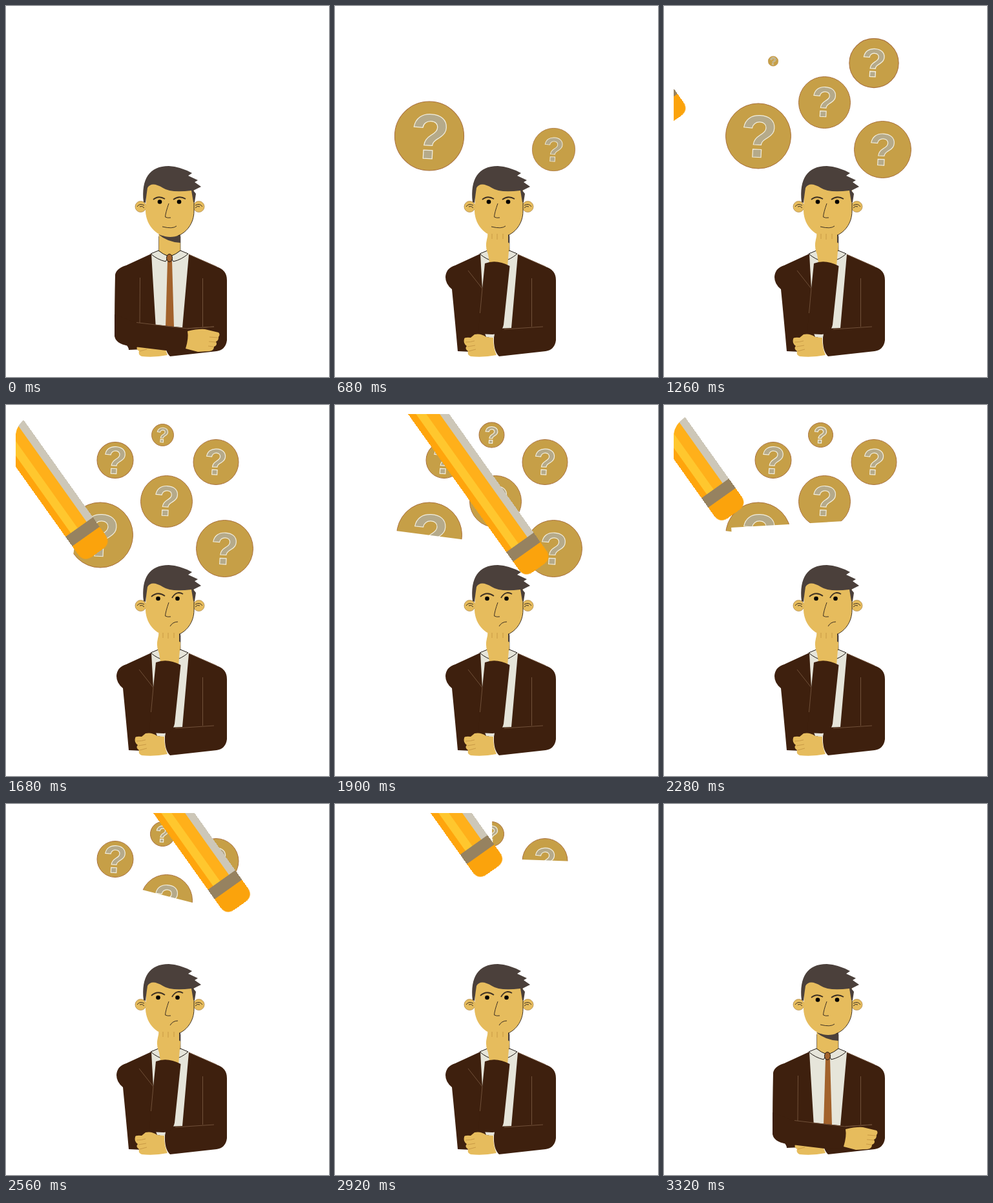
Recreate the animation shown at these times as an HTML page without scripts. Size 500x575 px, loop 4000 ms.

```html
<!DOCTYPE html>
<html lang="en">
<head>
<meta charset="utf-8">
<title>Questions erased</title>
<style>
html, body { margin: 0; width: 100%; height: 100%; overflow: hidden; background: #fff; }
svg { display: block; width: 100vw; height: 100vh; }

.skin { fill: #e6bc5d; }
.suit { fill: #3e200e; }
.shirt { fill: #e6e5da; }
.hair { fill: #4b403b; }
.seam { fill: none; stroke: #705039; stroke-width: 1; }
.line { fill: none; stroke: #3d3022; stroke-width: 1; }
.brow { fill: none; stroke: #3d3022; stroke-width: 1.8; }
.crease { fill: none; stroke: #c99a45; stroke-width: 1; }
.collar { stroke: #1c1611; stroke-width: 1; stroke-linejoin: round; }

.bubble circle { fill: #c69f47; stroke: #a9713f; stroke-width: 1; }
.bubble text {
  font-family: "Liberation Sans", Arial, sans-serif; font-weight: 700; text-anchor: middle;
  fill: #b5aa8a; stroke: #f3efdf; stroke-width: 1.2;
}

.bubble, .pencil, .wipe path, .calm, .think, .armA, .armB, .upper, .foldA, .foldB {
  animation: 4s linear infinite both;
}

/* bubbles spring out one after another */
.bubble { animation-name: pop; animation-delay: var(--t); }
@keyframes pop {
  0% { transform: scale(0); }
  1.2% { transform: scale(.27); }
  4.5% { transform: scale(.75); }
  6.5% { transform: scale(1.03); }
  7.7% { transform: scale(1.1); }
  9.8% { transform: scale(1.06); }
  11.8%, 62% { transform: scale(1); }
  62.01%, 100% { transform: scale(0); }
}

/* eraser strokes */
.wipe path { fill: none; stroke: #000; stroke-width: 100; stroke-dasharray: 1 2; }
.wipe .w1 { animation-name: w1; }
.wipe .w2 { animation-name: w2; }
.wipe .w3 { animation-name: w3; }
.wipe .w4 { animation-name: w4; }
.wipe .w5 { animation-name: w5; }
@keyframes w1 { 0%, 40% { stroke-dashoffset: 1; } 50.5%, 100% { stroke-dashoffset: 0; } }
@keyframes w2 { 0%, 50.5% { stroke-dashoffset: 1; } 56%, 100% { stroke-dashoffset: 0; } }
@keyframes w3 { 0%, 58% { stroke-dashoffset: 1; } 65%, 100% { stroke-dashoffset: 0; } }
@keyframes w4 { 0%, 65% { stroke-dashoffset: 1; } 70.5%, 100% { stroke-dashoffset: 0; } }
@keyframes w5 { 0%, 70.5% { stroke-dashoffset: 1; } 76%, 100% { stroke-dashoffset: 0; } }

.pencil { animation-name: scrub; }
@keyframes scrub {
  0%, 30% { transform: translate(-70px, 140px); }
  31.5% { transform: translate(-.5px, 151px); }
  40% { transform: translate(60px, 195px); }
  47.5% { transform: translate(296px, 227.5px); }
  50% { transform: translate(370px, 236px); }
  51% { transform: translate(362px, 202px); }
  56% { transform: translate(75px, 180px); }
  57% { transform: translate(89.5px, 144.5px); }
  58% { transform: translate(96px, 118px); }
  64% { transform: translate(344px, 132.5px); }
  65% { transform: translate(348px, 130px); }
  70.5% { transform: translate(128px, 100px); }
  76% { transform: translate(340px, 52px); }
  79%, 100% { transform: translate(265px, -60px); }
}

.calm { animation-name: calm; }
.think { animation-name: think; }
@keyframes calm { 0%, 41.5% { opacity: 1; } 41.51%, 76% { opacity: 0; } 76.01%, 100% { opacity: 1; } }
@keyframes think { 0%, 41.5% { opacity: 0; } 41.51%, 76% { opacity: 1; } 76.01%, 100% { opacity: 0; } }

/* the crossed forearm swings up to the chin and back */
.armA { animation-name: armA; transform-origin: 185px 512px; }
.armB { animation-name: armB; transform-origin: 245px 500px; }
@keyframes armA {
  0%, 6% { transform: none; opacity: 1; }
  11.5% { transform: translate(30px, -6px) rotate(-44deg); opacity: 1; }
  11.51%, 78% { transform: translate(30px, -6px) rotate(-44deg); opacity: 0; }
  78.01% { transform: translate(30px, -6px) rotate(-44deg); opacity: 1; }
  83%, 100% { transform: none; opacity: 1; }
}
@keyframes armB {
  0%, 11.5% { transform: translate(-30px, 6px) rotate(44deg); opacity: 0; }
  11.51% { transform: translate(-30px, 6px) rotate(44deg); opacity: 1; }
  17%, 73.5% { transform: none; opacity: 1; }
  78% { transform: translate(-30px, 6px) rotate(44deg); opacity: 1; }
  78.01%, 100% { transform: translate(-30px, 6px) rotate(44deg); opacity: 0; }
}
.upper { animation-name: upper; }
@keyframes upper {
  0%, 6%, 83%, 100% { d: path("M169 417Q170 407 186 402L225 384L232 500L212 532L190 533Q190 524 168 512Q168 460 169 417Z"); }
  17%, 73.5% { d: path("M171 420Q172 406 186 402L225 384L228 438L240 512L212 536L190 535Q186 490 181 439Q171 431 171 420Z"); }
}
.foldA { animation-name: foldA; }
.foldB { animation-name: foldB; }
@keyframes foldA { 0%, 7% { opacity: 1; } 7.01%, 82% { opacity: 0; } 82.01%, 100% { opacity: 1; } }
@keyframes foldB { 0%, 15% { opacity: 0; } 15.01%, 74% { opacity: 1; } 74.01%, 100% { opacity: 0; } }
</style>
</head>
<body>
<svg viewBox="0 0 500 575">
  <defs>
    <mask id="left" maskUnits="userSpaceOnUse" x="0" y="0" width="500" height="575">
      <rect width="500" height="575" fill="#fff"/>
      <g class="wipe">
        <path class="w1" pathLength="1" d="M30 237L405 286"/>
        <path class="w2" pathLength="1" d="M420 222L107 240"/>
        <path class="w3" pathLength="1" d="M80 151L400 233"/>
        <path class="w4" pathLength="1" d="M400 140L110 130"/>
        <path class="w5" pathLength="1" d="M110 50L400 50"/>
      </g>
    </mask>
    <clipPath id="frame"><path d="M38 14H485V560H15V45Q17 30 31 20Z"/></clipPath>
  </defs>

  <!-- bubbles -->
  <g mask="url(#left)">
    <g transform="translate(146 201.500)"><g class="bubble" style="--t:.29s"><circle r="50.500"/><text x="1" y="33" font-size="93" transform="rotate(3)">?</text></g></g>
    <g transform="translate(338.500 222.500)"><g class="bubble" style="--t:.5s"><circle r="44"/><text y="24.500" font-size="70" transform="rotate(3)">?</text></g></g>
    <g transform="translate(248.500 149.500)"><g class="bubble" style="--t:.71s"><circle r="40"/><text y="22" font-size="66" transform="rotate(3)">?</text></g></g>
    <g transform="translate(325 88.500)"><g class="bubble" style="--t:.96s"><circle r="35"/><text y="19.500" font-size="57" transform="rotate(3)">?</text></g></g>
    <g transform="translate(169 85.500)"><g class="bubble" style="--t:1.21s"><circle r="28"/><text y="21" font-size="60" transform="rotate(3)">?</text></g></g>
    <g transform="translate(242.500 46.500)"><g class="bubble" style="--t:1.46s"><circle r="19"/><text y="12.500" font-size="36" transform="rotate(3)">?</text></g></g>
  </g>

  <!-- neck, shirt, tie -->
  <path class="skin" d="M236.500 340H270V392H236.500Z"/>
  <path class="line" d="M236.500 357V380M270 357V380" opacity=".6"/>
  <path class="hair" d="M236 354Q253 360 270 351V367Q250 366 236 354Z"/>
  <path class="shirt" d="M224 384L252 388L283 384L274 502L231 502Z"/>
  <path fill="#a2622c" d="M250 395H257L260 498H247Z"/>
  <path class="shirt collar" d="M224 384L236 379Q243 385 252 388L247 396Q234 393 224 384Z"/>
  <path class="shirt collar" d="M254 388Q263 385 270 379L282 384Q272 393 259 396Z"/>
  <ellipse class="collar" cx="253" cy="390.500" rx="4.500" ry="6" fill="#a2622c"/>

  <!-- head -->
  <g stroke="#b08a4a" stroke-width=".8">
    <circle class="skin" cx="208.500" cy="311" r="8.500"/>
    <circle class="skin" cx="298.500" cy="311" r="8.500"/>
  </g>
  <path class="line" d="M203 311Q207 305 214 309M207 311Q211 309 214 313M304 311Q300 305 293 309M300 311Q296 309 293 313"/>
  <path class="skin" d="M218 268L216 318C217 342 235 358 254 358C275 358 291 340 291 318V268Z"/>
  <path class="line" d="M291 300V318C291 338 278 352 266 356"/>
  <path class="hair" d="M213 304C209 268 222 248 252 248Q270 249 288 259L282 263L297 270L292 273L302 280L290 286L294 291L292 304H290L287 286Q255 290 243 282Q225 271 219 282Q217 296 216 305Z"/>
  <path class="line" d="M252 306Q247 320 246.500 327Q250 329 255 328"/>
  <g class="calm">
    <circle cx="238" cy="303.500" r="3.300"/><circle cx="268" cy="303.500" r="3.300"/>
    <path class="brow" d="M228 300Q236 293 246 299M259 300Q268 293 278 299"/>
    <path class="line" d="M242 342Q258 346 264 341"/>
  </g>
  <g class="think">
    <circle cx="235.500" cy="300" r="3.300"/><circle cx="265.500" cy="300" r="3.300"/>
    <path class="brow" d="M225 297Q235 288 246 296M257 299Q264 287 274 293"/>
    <path class="line" d="M254 343Q258 336 266 336"/>
  </g>

  <!-- jacket -->
  <path class="upper suit" d="M169 417Q170 407 186 402L225 384L232 500L212 532L190 533Q190 524 168 512Q168 460 169 417Z"/>
  <path class="suit" d="M283 385L326 404Q342 409 342 425V518Q340 533 326 535L254 543Q245 535 246 513L248 500L273 499Z"/>
  <path class="seam" d="M304.500 422V497M262 501L322 497M283 385L326 404"/>
  <path class="seam foldA" d="M207.500 421L207 491"/>
  <path class="seam foldB" d="M206 410L228 438"/>
  <path class="shirt" d="M231 505L247 506L246 514L234 513Z"/>
  <path class="skin" d="M200 516Q200 513 210 514L216 509Q226 507 234 513L245 514Q245 530 250 541Q230 545 210 543Q204 540 206 535Q200 531 204 527Q198 523 200 516Z"/>
  <path class="crease" d="M202 521Q210 521 216 519M205 528L217 526M207 535L218 532"/>

  <!-- crossed forearm -->
  <g class="armA">
    <path class="suit" d="M168 478L202 491L281 499Q283 518 278 533L248 534L190 527Q168 523 168 510Z"/>
    <path class="seam" d="M202 490.500L281 500L322 497"/>
    <path class="skin" d="M281 504Q298 500 308 501L329 506Q332 509 329 513Q329 519 325 520Q328 526 322 528Q322 534 315 535L297 536L278 531Q283 515 281 504Z"/>
    <path class="crease" d="M328 514L315 513M325 521L314 520M321 528L313 527"/>
  </g>

  <!-- forearm at the chin -->
  <g class="armB">
    <path class="skin" d="M237 353Q239 350 243 352Q247 349 251 352Q256 349 260 352Q265 349 268 354L268 367L270 369L269 380L267 404H240L237 385Q232 375 235 362Z"/>
    <path class="crease" d="M243 353V361M251 353V362M260 353V361"/>
    <path class="suit" d="M232 399Q250 392 270.500 403L261 494Q258 508 244 509L222 508L224 475L228 438Z"/>
    <path class="seam" d="M228 438L224.500 476"/>
  </g>

  <!-- pencil -->
  <g clip-path="url(#frame)">
    <g class="pencil">
      <g transform="rotate(-35.400)">
        <path fill="#ffa50c" d="M-26 -420H26V-17H-26Z"/>
        <path fill="#ffc72e" d="M-16 -420H-3V-17H-16Z"/>
        <path fill="#ffb01a" d="M-3 -420H14V-17H-3Z"/>
        <path fill="#cdc7b8" d="M14 -420H26V-17H14Z"/>
        <path fill="#968260" d="M-26 -18H26V0H-26Z"/>
        <path fill="#fba30c" d="M-26 0H26V15Q26 31 10 31H-10Q-26 31 -26 15Z"/>
      </g>
    </g>
  </g>
</svg>
</body>
</html>
```
